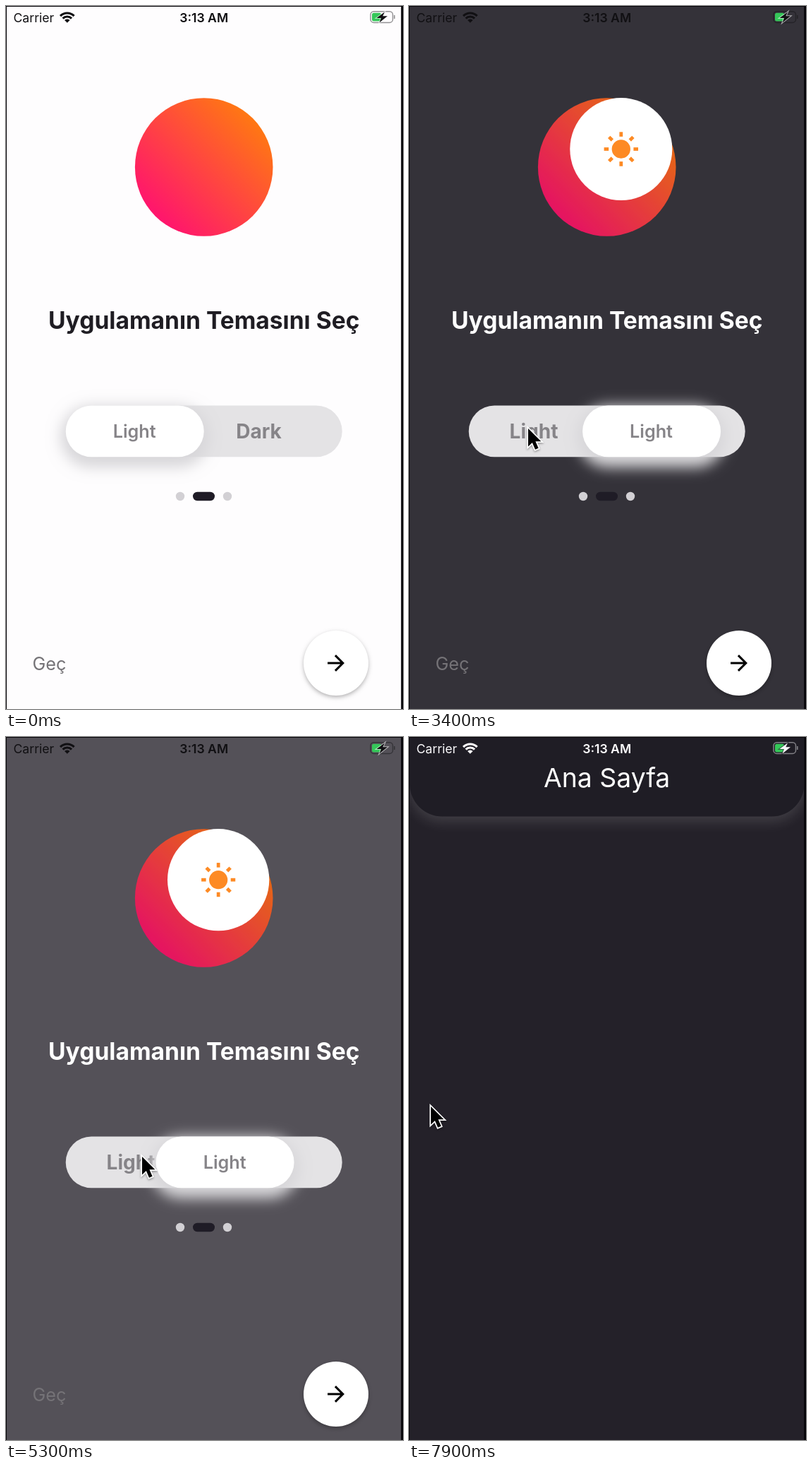
Animation of 563x995 px, one loop 8000 ms. Source, as an HTML page with a canvas:

```html
<!DOCTYPE html>
<html lang="tr">
<head>
<meta charset="utf-8">
<title>Tema</title>
<style>
html, body { margin: 0; width: 100%; height: 100%; overflow: hidden; background: #000; }
canvas { display: block; }
</style>
</head>
<body>
<canvas id="stage" width="563" height="995"></canvas>
<script>
const ctx = document.getElementById('stage').getContext('2d');
const W = 563, H = 995, LOOP = 8000, STEP = 100;
const LEFT = 1, RIGHT = 560.5, MID = 280.7;
const FONT = 'Inter, Roboto, "Liberation Sans", sans-serif';

const LIGHT = {
  bg: [254, 253, 254], ink: [31, 29, 35], status: '#111013', track: '#e4e3e5', knob: '#ffffff',
  glow: '#d8d7da', dot: '#1f1c26', fab: '#ffffff', arrow: '#000000', from: '#ff0080', to: '#ff8c00',
  label: 'Light', hole: '#ffffff'
};
const DARK = {
  bg: [36, 33, 41], ink: [255, 255, 255], status: '#fbfafc', track: '#1f1d25', knob: '#2e2b35',
  glow: 'rgba(0,0,0,.4)', dot: '#ffffff', fab: '#2e2a36', arrow: '#ffffff', from: '#8983f7', to: '#9dd0f9',
  label: 'Dark', hole: '#242129'
};

// Start times of each theme change: hole, knob, background, title
const TAPS = [
  [1735, 1892, 1800, 1966],
  [3350, 3349, 3385, 3585],
  [4313, 4315, 4327, 4527],
  [5224, 5222, 5256, 5456],
  [5989, 6011, 6009, 6209]
];
const PUSH = 7080;

// Pointer path: time, x, y
const PATH = [
  [100, 508, 8], [400, 352, 330], [700, 197, 601], [1000, 262, 592], [1400, 357, 601],
  [2200, 357, 601], [3050, 168, 596], [3500, 168, 596], [4150, 385, 597], [4500, 385, 597],
  [5050, 192, 592], [5350, 192, 592], [5850, 351, 595], [6200, 351, 595], [6900, 52, 916],
  [7250, 52, 916], [7800, 30, 521], [8000, 30, 521]
];

const STAR = new Path2D('M12 17.27L18.18 21l-1.64-7.03L22 9.24l-7.19-.61L12 2 9.19 8.63 2 9.24l5.46 4.73L5.82 21z');
const ARROW = new Path2D('M12 4l-1.41 1.41L16.17 11H4v2h12.17l-5.58 5.59L12 20l8-8z');
const POINTER = new Path2D('M1 2V27.5L6.8 22L11 31.8L15.6 29.8L11.4 20.2H19.3Z');
const BOLT = new Path2D('M537 8.5L525.5 17H532L529.5 23.5L541 14.3H534.3Z');

const clamp = v => Math.max(0, Math.min(1, v));
const mix = (a, b, p) => a + (b - a) * p;
const rgb = (a, b, p) => `rgb(${a.map((v, i) => Math.round(mix(v, b[i], p))).join()})`;

function bezier(x1, y1, x2, y2) {
  const at = (a, b, u) => 3 * a * u * (1 - u) ** 2 + 3 * b * u * u * (1 - u) + u ** 3;
  return x => {
    let lo = 0, hi = 1;
    for (let i = 0; i < 24; i++) {
      const m = (lo + hi) / 2;
      if (at(x1, x2, m) < x) lo = m; else hi = m;
    }
    return at(y1, y2, lo);
  };
}
const ease = bezier(.25, .1, .25, 1);
const slide = bezier(.35, .91, .33, .97);

function text(str, x, y, size, weight, color, align = 'center', spacing = 0) {
  ctx.font = `${weight} ${size}px ${FONT}`;
  ctx.letterSpacing = spacing + 'px';
  ctx.textAlign = align;
  ctx.fillStyle = color;
  ctx.fillText(str, x, y);
}

function disc(x, y, r, color) {
  ctx.beginPath();
  ctx.arc(x, y, r, 0, 7);
  ctx.fillStyle = color;
  ctx.fill();
}

function pill(x, y, w, h, color, r = h / 2) {
  ctx.beginPath();
  ctx.roundRect(x, y, w, h, r);
  ctx.fillStyle = color;
  ctx.fill();
}

// Paints only the blurred shadow of a shape
function shadow(color, blur, dy, draw) {
  const far = 3000;
  ctx.save();
  ctx.shadowColor = color;
  ctx.shadowBlur = blur;
  ctx.shadowOffsetX = far;
  ctx.shadowOffsetY = dy;
  ctx.translate(-far, 0);
  draw();
  ctx.restore();
}

function sun() {
  disc(0, 0, 13.2, '#fd8a24');
  for (let i = 0; i < 8; i++) {
    ctx.rotate(Math.PI / 4);
    ctx.fillRect(-2.4, -24.3, 4.8, 6.6);
  }
}

function orb(s) {
  const { to, bgP } = s, cx = MID, cy = 228, r = 97.8;
  const g = ctx.createLinearGradient(cx - r, cy + r, cx + r, cy - r);
  g.addColorStop(0, to.from);
  g.addColorStop(1, to.to);
  disc(cx, cy, r, g);
  if (to === LIGHT && bgP < 1) disc(cx, cy, r, 'rgba(0,0,0,.1)');
  if (s.hole < .002) return;
  ctx.save();
  ctx.translate(373.3, 130);
  ctx.scale(s.hole, s.hole);
  ctx.translate(-72.8, 72.8);
  disc(0, 0, 72.8, to.hole);
  if (to === LIGHT) sun();
  else {
    ctx.scale(2.15, 2.15);
    ctx.translate(-12, -12);
    ctx.globalAlpha = bgP;
    ctx.fillStyle = '#fff';
    ctx.fill(STAR);
  }
  ctx.restore();
}

function toggle(s) {
  const { to } = s, y = 565.5, h = 72.8, x = mix(84.7, 280.7, s.knob), gray = '#868488';
  pill(84.7, y, 392, h, to.track);
  text('Light', 177, 611.5, 28, 700, gray);
  text('Dark', 358.5, 611.5, 28, 700, gray);
  shadow(to.glow, 18.8, 7.5, () => pill(x - 7.5, y - 7.5, 211, h + 15, '#000'));
  pill(x, y, 196, h, to.knob);
  text(to.label, x + 97.5, 610.5, 25.2, 600, gray);
}

function themePage(s) {
  const { to } = s;
  ctx.fillStyle = s.bg;
  ctx.fillRect(LEFT, 1, RIGHT - LEFT, H);
  orb(s);
  text('Uygulamanın Temasını Seç', MID, 457, 33.6, 700, s.ink);
  toggle(s);
  disc(247, 694, 6.2, '#d2d0d4');
  disc(314, 694, 6.2, '#d2d0d4');
  pill(265, 687.8, 31, 12.4, to.dot);
  text('Geç', 37.5, 939.5, 25.2, 400, '#757377', 'left');
  shadow('rgba(0,0,0,.32)', 6, 2.5, () => disc(468, 930, 45.5, '#000'));
  disc(468, 930, 46, to.fab);
  ctx.save();
  ctx.translate(468, 930);
  ctx.scale(1.493, 1.493);
  ctx.translate(-12, -12);
  ctx.fillStyle = to.arrow;
  ctx.fill(ARROW);
  ctx.restore();
}

function homePage() {
  const w = RIGHT - LEFT;
  ctx.fillStyle = rgb(DARK.bg, DARK.bg, 0);
  ctx.fillRect(LEFT, 1, w, H);
  const head = () => pill(LEFT, -60, w, 172.5, '#1f1d25', 46);
  shadow('rgba(255,255,255,.14)', 19, 7, head);
  head();
  text('Ana Sayfa', MID, 70.5, 37.3, 400, '#fff');
}

function statusBar(color) {
  text('Carrier', 10.5, 22.5, 17.6, 400, color, 'left');
  text('3:13 AM', MID, 22.5, 17.6, 600, color);
  ctx.strokeStyle = ctx.fillStyle = color;
  const a = -Math.PI * .75, b = -Math.PI * .25;
  ctx.lineWidth = 3.2;
  for (const r of [13.8, 8.8]) {
    ctx.beginPath();
    ctx.arc(86.8, 23.8, r, a, b);
    ctx.stroke();
  }
  ctx.beginPath();
  ctx.moveTo(86.8, 23.8);
  ctx.arc(86.8, 23.8, 5.4, a, b);
  ctx.fill();

  ctx.save();
  ctx.globalAlpha = .45;
  ctx.lineWidth = 1.5;
  ctx.beginPath();
  ctx.roundRect(517, 7.8, 31.5, 15.6, 4.5);
  ctx.stroke();
  ctx.fillRect(550, 13, 1.6, 5);
  ctx.restore();
  pill(519, 9.8, 13, 11.6, '#35c759', 2.5);
  ctx.lineWidth = 2;
  ctx.strokeStyle = color === LIGHT.status ? 'rgba(255,255,255,.6)' : 'rgba(36,33,41,.6)';
  ctx.stroke(BOLT);
  ctx.fillStyle = color;
  ctx.fill(BOLT);
}

function pointer(t) {
  const i = PATH.findIndex(k => k[0] > t);
  if (i < 1) return;
  const [t0, x0, y0] = PATH[i - 1], [t1, x1, y1] = PATH[i];
  const u = (t - t0) / (t1 - t0), p = u * u * (3 - 2 * u);
  ctx.save();
  ctx.translate(mix(x0, x1, p), mix(y0, y1, p));
  ctx.shadowColor = 'rgba(0,0,0,.35)';
  ctx.shadowBlur = 3;
  ctx.shadowOffsetY = 1.5;
  ctx.lineWidth = 3.4;
  ctx.strokeStyle = '#fff';
  ctx.stroke(POINTER);
  ctx.shadowColor = 'transparent';
  ctx.fillStyle = '#000';
  ctx.fill(POINTER);
  ctx.restore();
}

function stateAt(t) {
  const n = TAPS.filter(k => k[0] <= t).length;
  const dark = n % 2 === 1, to = dark ? DARK : LIGHT, from = dark ? LIGHT : DARK;
  const [hole, knob, bg, ink] = n ? TAPS[n - 1] : [-9e3, -9e3, -9e3, -9e3];
  const run = (start, ms) => clamp((t - start) / ms);
  const h = run(hole, 800), v = dark ? h : 1 - h, k = ease(run(knob, 350)), bgP = run(bg, 200);
  return {
    to, bgP,
    hole: 1 - (1 - v) ** 2,
    knob: dark ? k : 1 - k,
    bg: rgb(from.bg, to.bg, bgP),
    ink: rgb(from.ink, to.ink, run(ink, 200))
  };
}

function draw(t) {
  const s = stateAt(t), p = t < PUSH ? 0 : slide(clamp((t - PUSH) / 400));
  ctx.fillStyle = '#050408';
  ctx.fillRect(0, 0, W, H);
  ctx.save();
  ctx.beginPath();
  ctx.rect(LEFT, 1, RIGHT - LEFT, H);
  ctx.clip();
  ctx.save();
  ctx.translate(-p * 560 / 3, 0);
  if (p < 1) themePage(s);
  ctx.restore();
  if (p > 0) {
    ctx.save();
    ctx.translate(560 * (1 - p), 0);
    homePage();
    ctx.restore();
  }
  statusBar(s.to.status);
  ctx.restore();
  pointer(t);
}

function tick(now) {
  const t = now % LOOP;
  draw(Math.floor(t / STEP) * STEP);
  requestAnimationFrame(tick);
}
draw(0);
requestAnimationFrame(tick);
</script>
</body>
</html>
```
